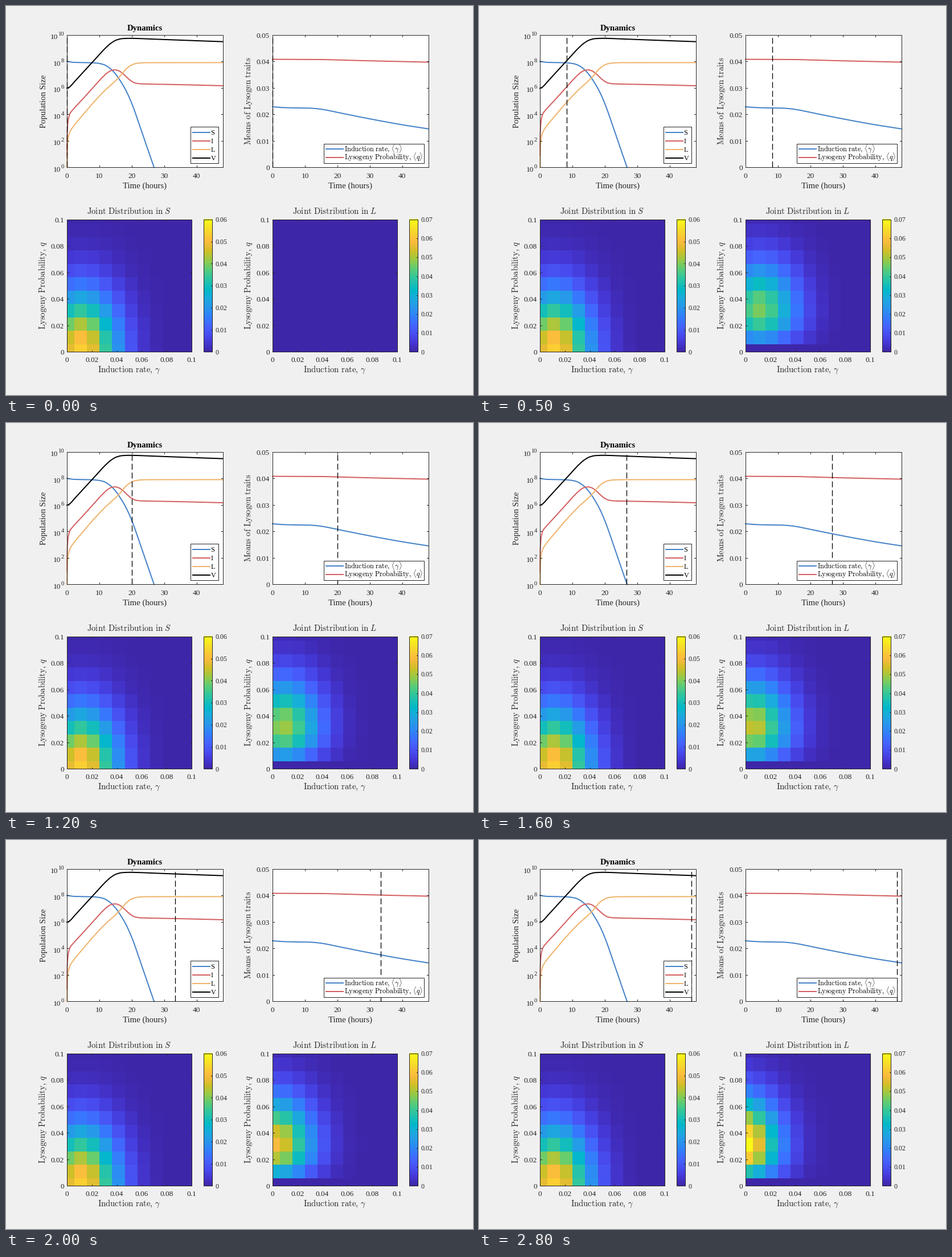
A matplotlib script that plays this animation: 820 px wide and 683 px high, repeating every 2900 ms.

```python
import numpy as np
import matplotlib.pyplot as plt
from matplotlib.animation import FuncAnimation
from matplotlib.colors import LinearSegmentedColormap
from matplotlib.patches import Rectangle

W, H, DPI = 820, 683, 100
PT = 72 / DPI  # points per pixel
FRAMES, STEP_MS = 29, 100
HOURS_PER_FRAME = 5 / 3

plt.rcParams.update({
    "font.family": "Liberation Serif",
    "mathtext.fontset": "cm",
    "lines.scale_dashes": False,
})

BG, INK = "#f0f0f0", "#262626"
BLUE, RED, ORANGE = "#4482c8", "#d45f60", "#f0b36b"
TICK, LABEL, SMALL = 13.33, 14.8, 12

PARULA = LinearSegmentedColormap.from_list("heat", [
    (k / 63, rgb) for k, rgb in [
        (0, "#3e26a8"), (4, "#4537d5"), (8, "#484df0"), (12, "#4563fd"),
        (15, "#3875fe"), (18, "#2e87f7"), (22, "#259be8"), (26, "#18addb"),
        (29, "#01b8ca"), (32, "#19bfb6"), (36, "#37c897"), (40, "#64cd6f"),
        (44, "#9dc943"), (48, "#d1bf27"), (52, "#f8ba3d"), (54, "#fec338"),
        (58, "#f7dc2a"), (63, "#f9fb15")]], N=256)

# the small excess keeps rounding from losing a pixel
fig = plt.figure(figsize=((W + 0.01) / DPI, (H + 0.01) / DPI), dpi=DPI, facecolor=BG)
ax = fig.add_axes([0, 0, 1, 1])
ax.set_xlim(0, W)
ax.set_ylim(H, 0)
ax.axis("off")


def text(x, y, s, size, ha="center", **kw):
    ax.text(x, y, s, fontsize=size * PT, ha=ha, va="baseline",
            rotation_mode="anchor", zorder=8, **{"color": INK, **kw})


def line(xs, ys, color=INK, width=1.0, z=3, **kw):
    return ax.plot(xs, ys, color=color, lw=width * PT, zorder=z, **kw)[0]


def box(x0, y0, x1, y1, face="none", edge=INK, z=5):
    ax.add_patch(Rectangle((x0, y0), x1 - x0, y1 - y0, facecolor=face,
                           edgecolor=edge, lw=PT, zorder=z))


def roman(words, symbol):
    """Upright TeX words followed by a math symbol."""
    words = words.replace(", ", r",\,").replace(" ", r"\ ")
    gap = r"\," if words.endswith(",") else r"\ "
    return rf"$\mathrm{{{words}}}{gap}{symbol}$"


def smooth(points, n=400):
    """Monotone cubic curve through a few points."""
    x, y = np.array(points, float).T
    h, d = np.diff(x), np.diff(y) / np.diff(x)
    m = np.r_[d[0], np.zeros(len(x) - 2), d[-1]]
    same = d[:-1] * d[1:] > 0
    m[1:-1][same] = (2 * d[:-1] * d[1:])[same] / (d[:-1] + d[1:])[same]
    xs = np.r_[np.linspace(x[0], x[0] + 12, 80), np.linspace(x[0] + 12, x[-1], n)]
    k = np.clip(np.searchsorted(x, xs, side="right") - 1, 0, len(h) - 1)
    s = (xs - x[k]) / h[k]
    ys = ((1 + 2 * s) * (1 - s) ** 2 * y[k] + s * (1 - s) ** 2 * h[k] * m[k]
          + s * s * (3 - 2 * s) * y[k + 1] + s * s * (s - 1) * h[k] * m[k + 1])
    return xs, ys


def ticks(x0, y0, x1, y1, xs, ys, size=3):
    for x in xs:
        line([x, x], [y1, y1 - size], z=6)
        line([x, x], [y0, y0 + size], z=6)
    for y in ys:
        line([x0, x0 + size], [y, y], z=6)
        line([x1, x1 - size], [y, y], z=6)


# Time panels
TOP, BOTTOM, SPAN = 51.0, 283.5, 273.5
LEFT_A, LEFT_B = 107.0, 468.0
PX_HOUR = SPAN / 48


def time_panel(left, ys):
    ax.add_patch(Rectangle((left, TOP), SPAN, BOTTOM - TOP, color="white", zorder=1))
    box(left, TOP, left + SPAN, BOTTOM)
    xs = [left + 10 * k * PX_HOUR for k in range(5)]
    ticks(left, TOP, left + SPAN, BOTTOM, xs, ys)
    for k, x in enumerate(xs):
        text(x, 301.5, str(10 * k), TICK)
    text(left + SPAN / 2, 320, "Time (hours)", LABEL)


levels = np.linspace(BOTTOM, TOP, 6)
time_panel(LEFT_A, levels)
time_panel(LEFT_B, levels)
for k, y in enumerate(levels):
    power = str(2 * k)
    text(102, y + 1, power, 10.67, ha="right")
    text(101.5 - 5.3 * len(power), y + 7, "10", TICK, ha="right")
    text(463, y + 4.5, f"{k / 100:.2f}" if k else "0", TICK, ha="right")

text(243.5, 43, "Dynamics", LABEL, weight="bold", color="black")
text(70, 167.5, "Population Size", LABEL, rotation=90)
text(430, 167, r"$\mathrm{Means\ of\ Lysogen\ traits}$", LABEL, rotation=90)

susceptible = [(107, 97.3), (120, 99), (150, 99.6), (162, 100.6), (172, 103),
               (182, 109), (192, 119), (203, 135), (212, 151), (222, 174),
               (232, 202), (246, 243), (260, 283.5)]
infected = [(107, 262), (107.6, 222), (109, 202), (112, 189.5), (118, 181.5),
            (130, 168.5), (154, 142), (170, 124.5), (180, 115.8), (186, 112.9),
            (192, 112.2), (198, 113.8), (205, 118.5), (213, 126), (220, 131.8),
            (227, 135.3), (237, 136.7), (300, 138), (380.5, 140)]
lysogens = [(107, 283.5), (107.7, 250), (109.5, 230), (113, 219.5), (119, 210.5),
            (130, 197), (154, 169), (175, 147), (190, 133.5), (200, 123.5),
            (210, 111.5), (218, 105), (226, 101.5), (237, 99.9), (252, 99.5),
            (380.5, 99.4)]
viruses = [(107, 144.3), (110, 143.3), (114, 140), (120, 133.2), (154, 96.3),
           (175, 73.5), (185, 64.8), (194, 59.7), (204, 57.3), (217, 56.8),
           (260, 58.2), (300, 59.8), (380.5, 62.6)]
induction = [(468, 177), (480, 178), (500, 178.8), (530, 179.2), (546, 180.3),
             (560, 182.3), (582, 186.8), (620, 194.5), (658, 201.8),
             (696, 208.6), (741.5, 215.7)]
lysogeny = [(468, 93.6), (550, 93.9), (582, 94.7), (620, 95.8), (741.5, 98.6)]

for points, color in [(susceptible, BLUE), (infected, RED), (lysogens, ORANGE),
                      (viruses, "black"), (induction, BLUE), (lysogeny, RED)]:
    line(*smooth(points), color=color, width=2)


def legend(x0, y0, x1, y1, first, rows, x_line, x_text):
    box(x0, y0, x1, y1, face="white", z=7)
    for k, (label, color) in enumerate(rows):
        y = first + 15 * k
        line([x_line, x_line + 29.5], [y, y], color=color, width=2, z=8)
        text(x_text, y + 4, label, 12.2, ha="left", color="black")


legend(323.5, 212, 372.5, 276, 222,
       [("S", BLUE), ("I", RED), ("L", ORANGE), ("V", "black")], 328, 359.5)
legend(558, 242.5, 733.5, 276, 251,
       [(roman("Induction rate,", r"\langle\gamma\rangle"), BLUE),
        (roman("Lysogeny Probability,", r"\langle q\rangle"), RED)], 562, 594)

cursors = [line([x, x], [BOTTOM, TOP], color="black", width=1.3, z=6.5,
                dashes=(10.5 * PT, 5 * PT), dash_capstyle="butt")
           for x in (LEFT_A, LEFT_B)]

# Joint distributions on an 11 x 11 trait grid
MAP_TOP, MAP_BOTTOM, MAP_W = 375.0, 607.5, 219.0
MAP_H = MAP_BOTTOM - MAP_TOP
edges = np.r_[0, 0.006 + 0.0101 * np.arange(10), 0.1]
gamma, q = np.meshgrid(0.01 * np.arange(11), 0.01 * np.arange(11))
joint = np.exp(-(gamma - 0.0098) ** 2 / 0.0009 - q ** 2 / 0.00194)
MASS = 0.943


def lysogen_joint(hours):
    if hours == 0:
        return np.zeros_like(joint)
    # selection against induction starts once hosts run out
    age = 1.5 * np.logaddexp(0, (hours - 13.5) / 1.5)
    p = q * joint * np.exp(-age * (gamma + 0.07 * q))
    return MASS * p / p.sum()


def heat_panel(left, name, top, values):
    right = left + MAP_W
    mesh = ax.pcolormesh(np.round(left + edges * 10 * MAP_W),
                         np.round(MAP_BOTTOM - edges * 10 * MAP_H), values,
                         cmap=PARULA, vmin=0, vmax=top, zorder=2)
    box(left, MAP_TOP, right, MAP_BOTTOM)
    xs = np.linspace(left, right, 6)
    ys = np.linspace(MAP_BOTTOM, MAP_TOP, 6)
    ticks(left, MAP_TOP, right, MAP_BOTTOM, xs, ys, 2.5)
    for k in range(6):
        label = f"{k / 50:g}"
        text(xs[k], 625, label, TICK)
        text(left - 5, ys[k] + 4.5, label, TICK, ha="right")
    mid = left + MAP_W / 2
    text(mid, 365, roman("Joint Distribution in", name), LABEL)
    text(mid, 643, roman("Induction rate,", r"\gamma"), LABEL)
    text(left - 38, 491, roman("Lysogeny Probability,", "q"), LABEL, rotation=90)

    bar = left + 240
    ax.imshow(np.linspace(1, 0, 256)[:, None], cmap=PARULA, aspect="auto",
              extent=(bar, bar + 15, MAP_BOTTOM, MAP_TOP), zorder=2)
    box(bar, MAP_TOP, bar + 15, MAP_BOTTOM)
    count = round(top * 100)
    for k in range(count + 1):
        y = MAP_BOTTOM - MAP_H * k / count
        line([bar + 12.5, bar + 15], [y, y], z=6)
        text(bar + 20, y + 4, f"{k / 100:.2f}" if k else "0", SMALL, ha="left")
    return mesh


heat_panel(LEFT_A, "S", 0.06, 0.053 * joint)
lysogen_map = heat_panel(LEFT_B, "L", 0.07, lysogen_joint(0))
ax.set_xlim(0, W)
ax.set_ylim(H, 0)


def update(i):
    hours = i * HOURS_PER_FRAME
    for cursor, left in zip(cursors, (LEFT_A, LEFT_B)):
        cursor.set_xdata([left + hours * PX_HOUR] * 2)
    lysogen_map.set_array(lysogen_joint(hours))
    return [*cursors, lysogen_map]


anim = FuncAnimation(fig, update, frames=FRAMES, interval=STEP_MS,
                     repeat=True, repeat_delay=0, blit=False)
plt.show()
```
